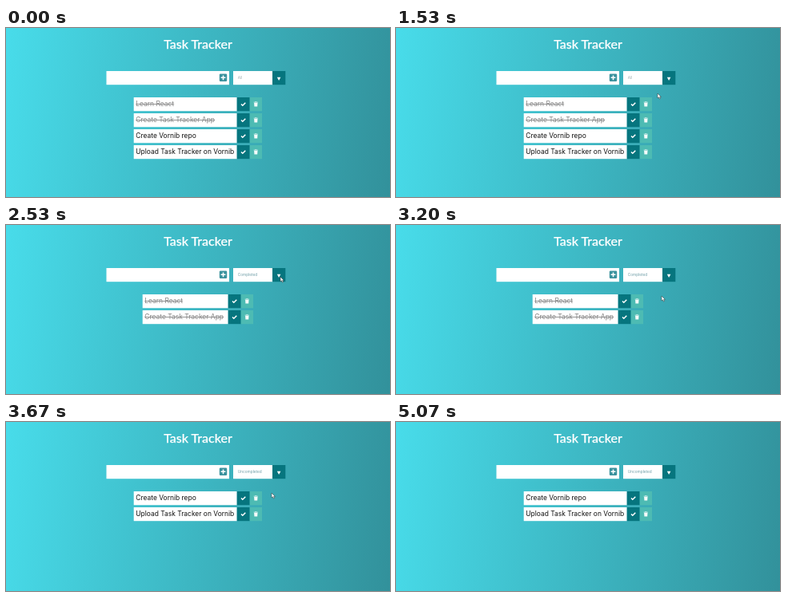
An HTML page that plays this animation: 480 by 212 pixels, repeating every 5.34 s.

```html
<!DOCTYPE html>
<html lang="en">
<head>
<meta charset="utf-8">
<title>Task Tracker</title>
<style>
  html, body { margin: 0; width: 100%; height: 100%; overflow: hidden; }
  body { background: linear-gradient(97deg, #48dcea, #32919b); }
  svg { display: block; width: 100%; height: 100%; }
  text { font-family: Inter, sans-serif; }
  .title { font: 500 16px Lato, sans-serif; fill: #fff; stroke: #fff; stroke-width: .25; text-anchor: middle; }
  .task { font-size: 8.45px; fill: #111; }
  .done { fill: #828282; text-decoration: line-through; }
  .label { font-size: 4.75px; fill: #6d9da6; }
</style>
</head>
<body>
<svg viewBox="0 0 480 212">
  <defs>
    <path id="check" d="M-2.6 .1 L-.8 1.9 L2.7 -1.7" fill="none" stroke="#fff" stroke-width="1.5"/>
    <path id="bin" d="M-2.6 -2.6 H-1 L-.6 -3.1 H.6 L1 -2.6 H2.6 V-1.8 H-2.6 Z M-2.2 -1.4 H2.2 L1.9 3 H-1.9 Z" fill="#f4fbfa"/>
  </defs>
  <text class="title" x="240" y="26">Task Tracker</text>
  <rect x="125.5" y="54" width="153.5" height="17.2" fill="#fff"/>
  <rect x="266.8" y="57.6" width="9.4" height="9.4" rx="1.2" fill="#3a929d"/>
  <path d="M268.6 62.3 H274.4 M271.5 59.4 V65.2" stroke="#fff" stroke-width="1.5"/>
  <rect x="284" y="54" width="49.5" height="17.2" fill="#fff"/>
  <rect x="333" y="54" width="16.3" height="17.2" fill="#06757e"/>
  <path d="M338.8 61.8 H343.4 L341.1 66 Z" fill="#fff"/>
  <text id="label" class="label" x="289.7" y="64.4"></text>
  <g id="list"></g>
  <path id="cursor" d="M0 0 V6 L1.5 4.8 L2.5 7 L3.6 6.5 L2.6 4.4 H4.4 Z" fill="#fff" stroke="#333" stroke-width=".5"/>
</svg>
<script>
const LOOP = 5340, STEP = 200 / 3;
const $ = id => document.getElementById(id);

const tasks = [
  { name: 'Learn React', done: true },
  { name: 'Create Task Tracker App', done: true },
  { name: 'Create Vornib repo', done: false },
  { name: 'Upload Task Tracker on Vornib', done: false }
];

// [time, tip x, tip y]
const path = [
  [400, 335, 61], [733, 335, 61], [930, 315, 76], [1140, 315, 76], [1330, 327, 82],
  [1740, 327, 82], [2200, 342, 65], [2270, 343, 65], [2800, 343, 65], [2930, 336, 85],
  [3140, 336, 85], [3200, 332, 89], [4140, 332, 89], [4400, 346, 76], [4667, 368, 68]
];

function row(task, i, left, width) {
  const y = 87 + i * 20, right = left + width;
  return `<rect x="${left}" y="${y}" width="${width}" height="17.2" fill="#fff"/>
    <rect x="${right}" y="${y}" width="16" height="17.2" fill="#06757e"/>
    <rect x="${right + 16}" y="${y}" width="15.3" height="17.2" fill="#4dbbb3"/>
    <text class="task ${task.done ? 'done' : ''}" x="${left + 2.6}" y="${y + 11.2}">${task.name}</text>
    <use href="#check" x="${right + 7.9}" y="${y + 8.4}"/>
    <use href="#bin" x="${right + 23.6}" y="${y + 8.4}"/>`;
}

function listFor(filter) {
  const wide = filter !== 'Completed';
  return tasks
    .filter(t => filter === 'All' || t.done === (filter === 'Completed'))
    .map((t, i) => row(t, i, wide ? 159.7 : 170.7, wide ? 129 : 107))
    .join('');
}

function cursorAt(t) {
  const k = path.findIndex(p => p[0] > t);
  if (k < 0) return path[path.length - 1].slice(1);
  const [t0, x0, y0] = path[Math.max(k - 1, 0)], [t1, x1, y1] = path[k];
  const u = t1 > t0 ? Math.max(0, (t - t0) / (t1 - t0)) : 0;
  return [x0 + (x1 - x0) * u, y0 + (y1 - y0) * u];
}

const pick = (t, toDone, toOpen) => t < toDone ? 'All' : t < toOpen ? 'Completed' : 'Uncompleted';
let shown = '';

function draw(t) {
  const filter = pick(t, 1730, 3665), label = pick(t, 1730, 3400);
  if (filter !== shown) $('list').innerHTML = listFor(shown = filter);
  $('label').textContent = label;
  $('label').style.fill = label === 'All' ? '#a5b2b5' : '';
  const [x, y] = cursorAt(Math.floor((t + 2) / STEP) * STEP);
  $('cursor').setAttribute('transform', `translate(${x} ${y})`);
  $('cursor').setAttribute('visibility', t >= 400 && t < 5065 ? 'visible' : 'hidden');
}

function tick() {
  draw(performance.now() % LOOP);
  requestAnimationFrame(tick);
}
tick();
</script>
</body>
</html>
```
